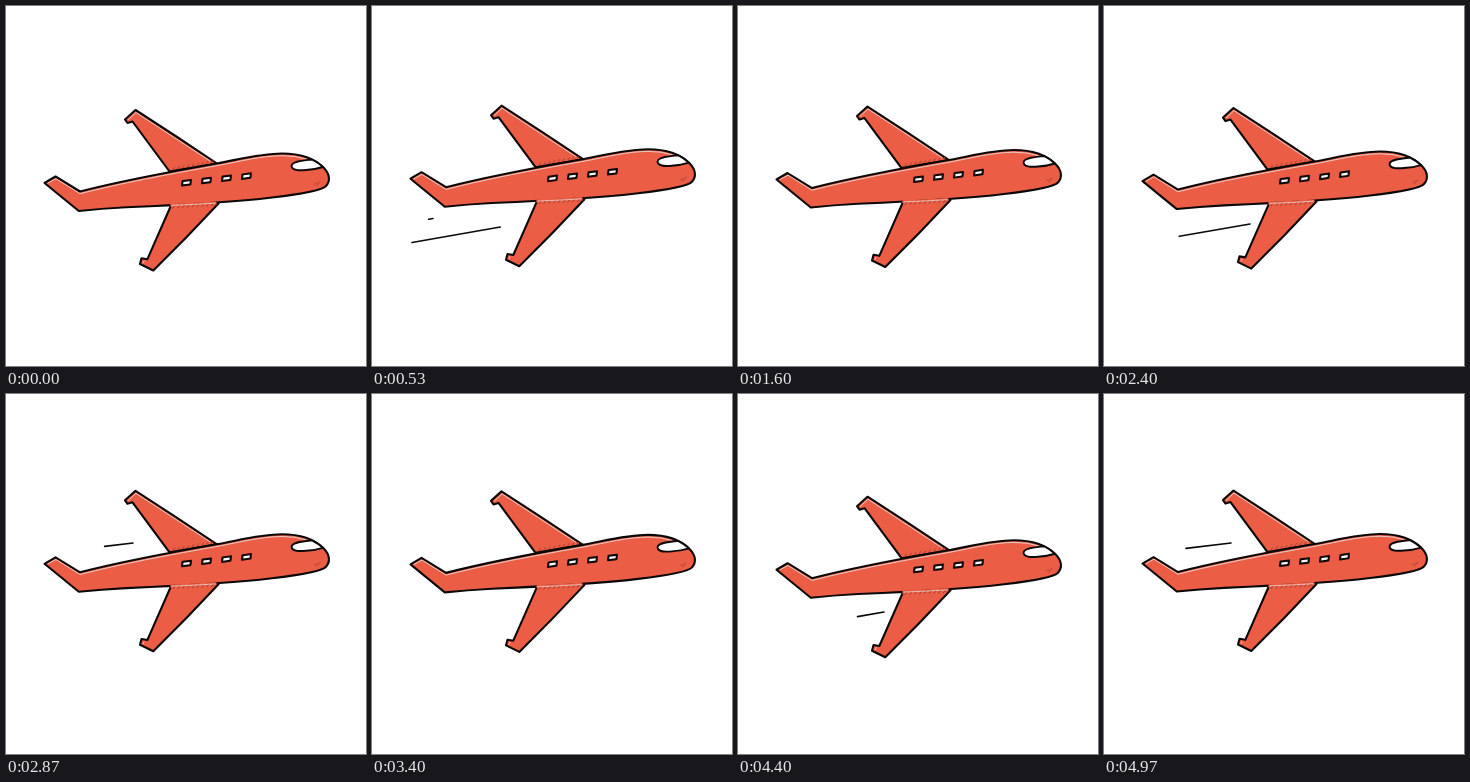
Write an HTML page with a canvas that moves like this. It is 360 by 360 pixels and loops after 5000 ms.

```html
<!DOCTYPE html>
<html lang="en">
<head>
<meta charset="utf-8">
<title>Plane</title>
<style>
html, body { margin: 0; width: 100%; height: 100%; overflow: hidden; background: #fff; }
canvas { display: block; width: 360px; height: 360px; }
</style>
</head>
<body>
<canvas id="stage" width="360" height="360"></canvas>
<script>
const ctx = document.getElementById('stage').getContext('2d');
const LOOP = 5000, STEP = 1000 / 30, FRAMES = 150, CYCLE = 62;
const RED = '#ec5d45', INK = '#0c0808', SHINE = '#e6cbc4', SCRATCH = '#983a2c';

const upperWing = new Path2D(
  'M163.500 165.500 L126.500 115.500 L121.500 117 L119 113.500 L129.500 104 Q170 130 211 157.500 Z');
const lowerWing = new Path2D(
  'M165 199.500 L141.300 253.300 L135.500 252.300 L134 258 L147.300 264.500 Q180.500 232 212.500 197.500 Z');
const body = new Path2D(
  'M38.500 177 L49.500 170.500 L74 185.500 C115 175 160 166.500 211 157.500 ' +
  'C235 153 255 147.500 276 147.500 C296 147.500 309 153 317.500 161.500 ' +
  'C324 168 324.500 175 320 180 C316 184.500 290 188.700 266 191.500 ' +
  'C225 196.500 175 199 120 201.300 Q95 202.700 72.800 205 Z');
const cockpit = new Path2D(
  'M306 153.500 C298 154.500 286 155 285.500 160 C286 165 294 164.500 300 164 Q309 163.500 317 161 Q312 156.500 306 153.500 Z');
const shine = new Path2D(
  'M42 177 L50 172.700 L74 187.700 C115 177.200 160 168.700 211 159.700 ' +
  'C235 155.200 255 149.900 276 149.700 Q290 149.700 300 153 ' +
  'M122.500 113.500 L130 106.500 L204 155 M138 255 L137 257');
const root = new Path2D('M166 199.400 Q190 198.500 209 197.200');

// Speed lines: right end, left end, first tick, ticks until the tail follows
const trails = [
  [146, 218, 40, 236.5, 6.8, 8.4],
  [61, 212.5, 38, 216.5, 15.1, 4],
  [127, 149, 47, 158.5, 22.3, 8.4]
];
const GROW = 4.8;

const clamp = v => Math.max(0, Math.min(1, v));

function stroke(path, color, width) {
  ctx.strokeStyle = color;
  ctx.lineWidth = width;
  ctx.stroke(path);
}

function shape(path, fill, width) {
  ctx.fillStyle = fill;
  ctx.fill(path);
  stroke(path, INK, width);
}

function line(x1, y1, x2, y2, color, width) {
  ctx.strokeStyle = color;
  ctx.lineWidth = width;
  ctx.beginPath();
  ctx.moveTo(x1, y1);
  ctx.lineTo(x2, y2);
  ctx.stroke();
}

function drawTrail([x1, y1, x2, y2, start, lag], tick) {
  const head = clamp((tick - start) / GROW);
  const tail = clamp((tick - start - lag) / GROW);
  if (head <= tail) return;
  const dx = x2 - x1, dy = y2 - y1;
  line(x1 + dx * tail, y1 + dy * tail, x1 + dx * head, y1 + dy * head, INK, 1.6);
}

function drawWindow(x, y) {
  ctx.save();
  ctx.translate(x, y);
  ctx.transform(1, -0.13, -0.1, 1, 0, 0);
  const pane = new Path2D();
  pane.rect(-4.2, -2.2, 8.4, 4.4);
  shape(pane, '#fff', 2.1);
  ctx.restore();
}

function drawPlane() {
  shape(upperWing, RED, 2.1);
  shape(lowerWing, RED, 2.1);
  shape(body, RED, 2.1);
  stroke(root, RED, 3.6);
  stroke(root, SHINE, 0.9);
  stroke(shine, SHINE, 1);
  for (let i = 0; i < 9; i++) {
    const x = 167 + i * 4.8;
    line(x, 163.5 - i * 0.85, x + 1.5, 161.2 - i * 0.85, SCRATCH, 0.8);
    line(x, 202 - i * 0.25, x + 1.5, 200 - i * 0.25, SCRATCH, 0.9);
  }
  for (let i = 0; i < 4; i++) drawWindow(180.5 + i * 20, 176.7 - i * 2.2);
  shape(cockpit, '#fff', 1.9);
  line(308.5, 178.5, 310.5, 176.5, SCRATCH, 0.8);
  line(310.5, 179.5, 314, 175.5, SCRATCH, 0.8);
}

function draw() {
  const frame = Math.round((performance.now() % LOOP) / STEP) % FRAMES;
  const tick = frame % CYCLE;
  ctx.fillStyle = '#fff';
  ctx.fillRect(0, 0, 360, 360);
  ctx.lineCap = ctx.lineJoin = 'round';
  for (const t of trails) drawTrail(t, tick);
  ctx.save();
  ctx.translate(0, 4.1 * (Math.cos(2 * Math.PI * tick / CYCLE) - 1));
  drawPlane();
  ctx.restore();
  requestAnimationFrame(draw);
}
draw();
</script>
</body>
</html>
```
